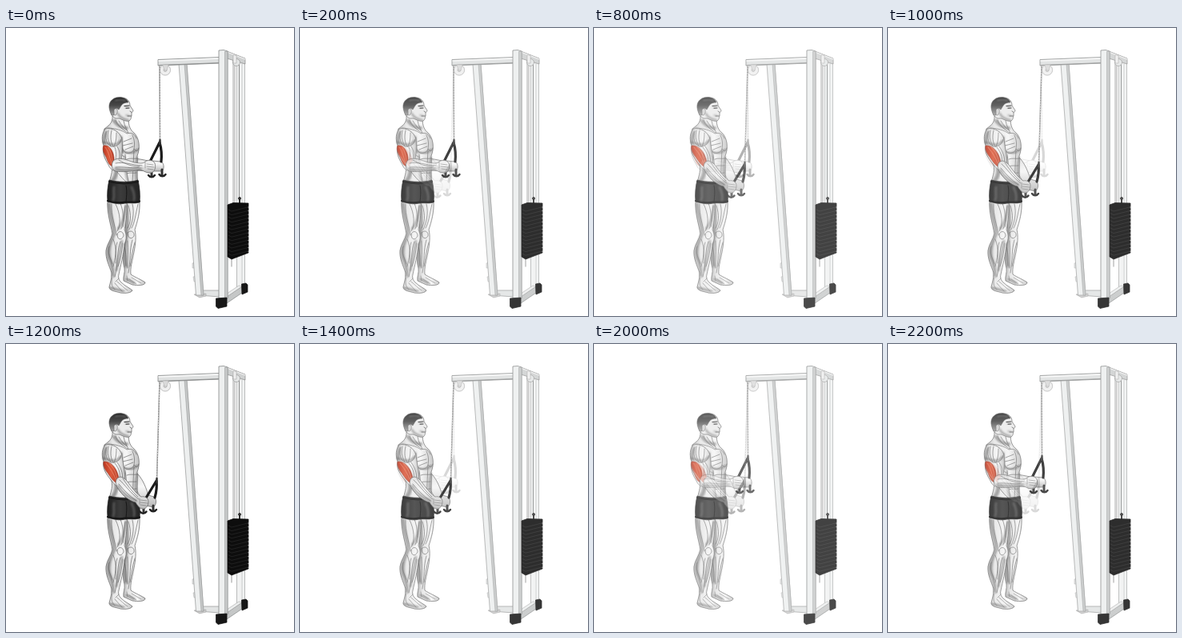
An HTML page that plays this animation: 360x360 px, repeating every 2.4 s.

```html
<!DOCTYPE html>
<html lang="en">
<head>
<meta charset="utf-8">
<title>Cable pushdown</title>
<style>
html, body { margin: 0; width: 100%; height: 100%; overflow: hidden; background: #fff; }
svg { display: block; width: 100vw; height: 100vh; }
</style>
</head>
<body>
<svg id="stage" viewBox="0 0 360 360">
  <defs>
    <linearGradient id="skin">
      <stop offset="0" stop-color="#b4b4b4"/><stop offset=".25" stop-color="#e6e6e6"/>
      <stop offset=".65" stop-color="#f6f6f6"/><stop offset="1" stop-color="#c2c2c2"/>
    </linearGradient>
    <linearGradient id="limb" x2="0" y2="1">
      <stop offset="0" stop-color="#dcdcdc"/><stop offset=".4" stop-color="#f8f8f8"/><stop offset="1" stop-color="#b8b8b8"/>
    </linearGradient>
    <linearGradient id="hair" x2="0" y2="1">
      <stop offset="0" stop-color="#2e2e2e"/><stop offset=".45" stop-color="#484848"/><stop offset="1" stop-color="#a4a4a4"/>
    </linearGradient>
    <linearGradient id="cloth">
      <stop offset="0" stop-color="#1e1e1e"/><stop offset=".4" stop-color="#3c3c3c"/><stop offset="1" stop-color="#242424"/>
    </linearGradient>
    <linearGradient id="red">
      <stop offset="0" stop-color="#b9351f"/><stop offset=".5" stop-color="#dc5a3c"/><stop offset="1" stop-color="#b43a25"/>
    </linearGradient>
    <filter id="soft" x="-30%" y="-30%" width="160%" height="160%"><feGaussianBlur stdDeviation="1"/></filter>
  </defs>
  <g id="raised"></g>
  <g id="lowered"></g>
</svg>
<script>
const shape = (d, fill, stroke = '#606060', width = .7) =>
  `<path d="${d}" fill="${fill}" stroke="${stroke}" stroke-width="${width}" stroke-linejoin="round"/>`;
const line = (d, color = '#626262', width = .65, extra = '') =>
  `<path d="${d}" fill="none" stroke="${color}" stroke-width="${width}" stroke-linecap="round" stroke-linejoin="round" ${extra}/>`;
const shade = (d, width = 3, color = '#555', alpha = .55) =>
  line(d, color, width, `filter="url(#soft)" opacity="${alpha}"`);
const disc = (x, y, r, fill, stroke = '#999') =>
  `<circle cx="${x}" cy="${y}" r="${r}" fill="${fill}" stroke="${stroke}" stroke-width=".7"/>`;

function machine() {
  let plates = '';
  for (let y = 224; y < 282; y += 4.6) {
    plates += line(`M278 ${y + 3}L282 ${y + 5}L302 ${y}`, '#303030', .6) + line(`M302.8 ${y}h.6`, '#fff', .7);
  }
  return [
    // rear upright and guide rods
    shape('M288.5 40H298.5V325L288.5 331Z', '#f1f2f2', '#a0a2a2'),
    line('M284 40V222M286 42V222', '#8d8f8f', .8),
    line('M291.5 46V214', '#7d7f7f', .9),
    line('M295 44V322', '#c4c6c6', .8),
    line('M282 287V298', '#aaa', 1.2),
    // top frame and rear pulley
    shape('M276 29L299 38V45L276 38Z', '#cfd1d1', '#888'),
    line('M276 30L299 39', '#f2f2f2', 1.2),
    disc(288, 43, 4.5, '#e4e6e6', '#999'),
    shape('M284 34H288V44H284Z', '#eee', '#999', .5),
    // base
    shape('M276 336L295 323V331L276 344Z', '#c5c7c7', '#858787'),
    shape('M276 336L295 323L291 322L276 332Z', '#eceeee', '#999', .5),
    shape('M242 328H267V336L240 334Z', '#e2e4e4', '#929494'),
    shape('M235 333L250 332V335L242 337Z', '#ccc', '#999', .5),
    shape('M233 294L236 293V300H233ZM234 311L238 310V317H235Z', '#e2e4e4', '#aaa', .5),
    // slanted brace, beam and front upright
    shape('M216 45H226L247 334H237.5Z', '#edefef', '#929494'),
    shape('M223 45H226L247 334H244Z', '#c5c7c7', '#929494', .5),
    shape('M190 39.5L267 36.5V44L190 47Z', '#dee0e0', '#858787', .8),
    line('M191 41L267 38', '#fafafa', 1.3),
    line('M191 46.5L266 43.6', '#8d8f8f', 1),
    shape('M266 28L272 27.5L277 29V338H266Z', '#edefef', '#858787', .8),
    shape('M273.5 29.5L277 29V338H273.5Z', '#c6c8c8', '#929494', .5),
    shape('M262.5 338L276 337V348L265 350.5L262.5 348Z', '#171717', '#111'),
    shape('M294.5 320L300 319L302 321V330L295 333Z', '#171717', '#111'),
    // front pulley
    disc(199, 52.5, 6.6, '#efefef', '#aaa'),
    disc(199, 52.5, 2, '#ddd', '#aaa'),
    shape('M196 46H203L201 53H198Z', '#dadada', '#aaa', .5),
    // weight stack
    line('M292 213V220', '#333', 2),
    disc(292, 213, 1.6, '#333', '#222'),
    shape('M277 221L284 218.5L303 219V281L282 289L277 286Z', '#0d0d0d', '#080808'),
    plates
  ].join('');
}

function legs() {
  return [
    // far leg and foot
    shape('M147 215H167C168 230 164 243 161 252C163 260 162 270 160 280C158 291 155 300 156 308C162 312 170 315 174 318C174 322 165 322 158 321L147 316C146 311 149 306 148 300C145 290 146 278 149 268C151 258 149 240 147 215Z', 'url(#skin)'),
    shade('M150 220C153 235 152 247 151 258C149 268 147 282 150 298', 3.4),
    shade('M151 314L160 319', 3),
    line('M165 220C162 233 161 243 157 250M158 220C161 232 158 243 154 252M153 222C157 234 156 244 152 250M152 256C155 252 161 254 160 260C157 265 152 263 152 256M158 265C154 278 156 291 153 306M152 266C153 278 152 290 152 300M161 268C158 278 157 288 155 298M148 274C151 283 150 290 150 297'),
    line('M157 312L169 319M154 314L163 320M151 310L152 316', '#777', .6),
    // near leg and foot
    shape('M127 215H151C152 228 150 242 148 252C151 258 151 264 148 270C147 284 143 298 141 308C140 312 141 315 144 318C149 323 155 325 158 328C157 331 149 332 143 331C137 329 130 329 129 324C130 319 132 314 132 306C129 297 124 288 125 278C126 270 132 264 133 257C131 245 126 232 127 215Z', 'url(#skin)'),
    shade('M129 220C130 236 135 246 135 258C131 268 127 276 129 286C133 296 134 302 134 310', 3.4),
    shade('M150 222C148 236 145 246 140 251', 2.6),
    shade('M145 266C142 282 140 292 138 303', 2.6),
    shade('M131 325L147 329', 3.2),
    line('M132 220C131 235 137 248 138 259M137 220C143 232 144 246 139 254M143 219C148 232 147 244 144 251M149 222C147 232 149 240 146 249M139 258C140 253 147 253 147 260C144 266 139 265 139 258M143 267C138 279 141 292 136 311M134 264C140 277 136 288 134 298M146 269C145 280 143 289 140 298M129 273C126 281 131 288 133 295M139 268C136 278 138 286 137 294'),
    line('M139 317C144 321 147 325 152 328M136 319L145 329M133 312C131 318 132 323 136 327M141 313L137 317', '#707070', .6)
  ].join('');
}

function torso() {
  return [
    shape('M133 110C134 119 127 123 123 126C119 140 126 160 132 172C134 180 130 186 129 195H165C163 185 165 171 164 160C168 150 167 138 160 131C156 128 153 123 153 113Z', 'url(#skin)'),
    shade('M135 116C139 122 145 125 151 125', 4),
    shade('M145 153C151 158 159 157 164 152', 2.6),
    shade('M136 165C139 178 139 184 133 192', 5),
    shade('M144 136C145 143 144 150 146 156', 2.6),
    shade('M148 160C148 172 149 182 152 191M164 162C161 172 162 182 163 190', 2),
    line('M137 115C139 122 146 127 152 131M147 116C148 122 151 127 153 131M141 116C144 121 148 126 151 128M127 125C136 125 146 128 151 132C157 130 161 133 163 138'),
    line('M145 137C143 146 145 153 150 156C155 157 159 155 160 151C163 155 165 154 166 150M158 134C161 140 161 146 160 151M147 142L157 138M146 147L158 144M149 152L159 148'),
    line('M160 153C159 168 159 180 158 192M149 158C151 169 150 181 153 192M151 164C155 162 160 164 164 163M151 173C155 171 160 173 163 172M151 182C156 180 160 182 163 181M142 157L148 161M141 162L148 167M141 168L149 173M139 180C143 185 147 190 151 193M142 176L150 180'),
    // shorts
    shape('M129 190C140 193 156 193 165 190C167 199 168 209 167 218C160 220 154 218 149 219C142 221 134 219 127 217C126 208 127 198 129 190Z', 'url(#cloth)', '#222'),
    line('M129 192C141 195 155 195 165 192', '#1a1a1a', 2),
    line('M127 216C134 218 142 219 149 217.5C155 217 161 218.5 167 216.5', '#151515', 2),
    shade('M135 199C134 206 136 211 134 215M157 199C160 205 161 210 160 215', 3, '#777', .5),
    line('M150 197C152 206 150 212 150 219', '#151515', 1)
  ].join('');
}

function head() {
  return [
    shape('M131 104C128 95 134 87 144 87C151 87 155 91 155 97L159 103C159 105 157 105 157 106L157 110C156 111 157 114 154 116C151 117 146 115 142 113L137 113C133 111 131 108 131 104Z', '#ebebeb'),
    shade('M140 107C142 112 147 114 153 115', 2.2),
    shade('M149 99L153 99M150 109L155 110', 1.5),
    shape('M132 109C127 99 128 92 135 88C142 85 151 87 153 93C149 93 146 94 144 97L141 102L138 100L135 109Z', 'url(#hair)', '#555', .5),
    shade('M137 91C141 89 145 89 149 91', 1.4, '#888', .6),
    shape('M135 102C138 99 140 102 139 106C138 109 136 110 135 108Z', '#d5d5d5', '#666', .6),
    line('M148 97.5L154 97', '#333', 1.1),
    line('M150 100.3L154 100', '#333', 1),
    line('M152 110H156.5M155 104L157 105.4', '#555', .8)
  ].join('');
}

// Outlines of the arms, hands and rope; ends lists the two rope stoppers.
const raisedPose = {
  apex: [192.5, 142],
  farArm: 'M159 164C166 162 176 167 183 166L194 167C198 169 198 177 195 179H186L160 178Z',
  rope: 'M192 143L180 167M192 143C194 150 195 158 194 167',
  tails: 'M182 178V185M195 177V184',
  ends: [[182, 185], [195.5, 184]],
  upperArm: 'M124 126C133 124 143 130 145 139C146 151 145 163 142 174C139 181 131 179 128 171C123 163 120 156 122 147C119 139 120 131 124 126Z',
  upperLines: 'M139 148C144 156 143 165 139 171M136 149C139 157 137 164 136 170',
  triceps: 'M122 147C128 146 132 151 134 157C136 164 135 168 133 173C128 171 127 166 125 161C122 156 120 151 122 147Z',
  fibres: 'M124 149C129 156 130 163 132 170M128 149C132 156 133 162 133 169',
  forearm: 'M134 166C140 160 152 165 160 168C167 169 171 170 174 167C178 164 184 165 186 169C188 175 185 181 181 181C176 182 172 178 167 177C156 180 145 180 137 179C132 177 131 171 134 166Z',
  shadow: 'M137 176C147 179 160 177 169 175',
  tendons: 'M137 169C147 167 157 171 170 172M141 165C149 170 157 173 167 173M137 174C147 173 156 176 166 174',
  fingers: 'M176 170L184 171M176 173L185 174M177 176L184 177M174 168V175'
};
const loweredPose = {
  apex: [188.5, 170],
  farArm: 'M163 161C169 166 174 176 178 189L185 191C189 194 188 202 184 204L175 202L160 178Z',
  rope: 'M188 171L174 194M188 171C189 179 188 185 186 192',
  tails: 'M172 203V210M184 202V208',
  ends: [[171.5, 210.5], [184, 208]],
  upperArm: 'M124 126C133 124 143 130 145 139C146 149 149 160 149 172C147 181 138 180 133 172C126 164 120 156 122 147C119 139 120 131 124 126Z',
  upperLines: 'M139 148C145 156 147 165 145 172M136 149C143 157 143 165 142 171',
  triceps: 'M122 147C129 146 135 152 138 158C141 165 142 170 140 175C134 172 131 167 127 161C123 156 121 151 122 147Z',
  fibres: 'M125 149C131 156 135 163 138 171M129 149C136 156 138 163 139 169',
  forearm: 'M139 168C144 163 150 169 154 175C159 182 164 188 169 191C173 190 178 192 178 197C178 203 174 207 170 206C166 205 164 201 162 198C154 196 145 189 140 180C137 176 136 172 139 168Z',
  shadow: 'M140 177C146 187 154 193 163 196',
  tendons: 'M142 170C148 175 155 186 166 194M146 168C151 176 157 184 165 191M141 175C147 182 154 190 163 196',
  fingers: 'M168 195L176 196M168 198L177 199M168 201L175 202M167 193V200'
};

function upperArm(pose) {
  return [
    shape(pose.upperArm, 'url(#skin)'),
    shade('M122 143C129 145 137 149 143 141', 2.6),
    shade('M125 130C123 136 122 140 123 144', 2.6),
    line('M126 129C123 137 126 145 131 148C138 149 143 145 144 139M132 128C130 137 131 143 134 148M138 131C138 139 137 144 135 148M128 128C126 137 128 142 131 147'),
    line(pose.upperLines),
    shape(pose.triceps, 'url(#red)', '#99402f', .6),
    line(pose.fibres, '#ef9478', .7)
  ].join('');
}

function figure(pose) {
  const [x, y] = pose.apex;
  const stoppers = pose.ends.map(([cx, cy]) =>
    line(`M${cx - 4} ${cy - 1}C${cx - 2} ${cy + 2} ${cx + 2} ${cy + 2} ${cx + 4} ${cy - 1}`, '#222', 2.4)).join('');
  return machine() + [
    line(`M192 47L${x} ${y}`, '#858585', 1.5),
    line(`M192 47L${x} ${y}`, '#e0e0e0', .8, 'stroke-dasharray="1 2.2"'),
    shape(pose.farArm, 'url(#limb)'),
    legs(), torso(), head(),
    line(pose.tails, '#333', 3),
    line(pose.rope, '#1b1b1b', 3.2),
    line(`M${x} ${y - 2}V${y + 3}`, '#333', 2.4),
    stoppers,
    upperArm(pose),
    shape(pose.forearm, 'url(#limb)'),
    shade(pose.shadow, 2.6),
    line(pose.tendons), line(pose.fingers, '#707070', .6)
  ].join('');
}

const raised = document.getElementById('raised');
const lowered = document.getElementById('lowered');
raised.innerHTML = figure(raisedPose);
lowered.innerHTML = figure(loweredPose);

const STEP = 200, STEPS = 12;
const start = performance.now();

// Both poses are partly transparent on white, so blacks lighten mid-fade.
function draw(time) {
  const step = Math.floor(Math.max(0, time) / STEP) % STEPS;
  const mix = (step <= 6 ? step : STEPS - step) / 6;
  raised.setAttribute('opacity', 1 - mix);
  lowered.setAttribute('opacity', mix);
}

function tick(now) {
  draw(now - start);
  requestAnimationFrame(tick);
}
draw(0);
requestAnimationFrame(tick);
</script>
</body>
</html>
```
